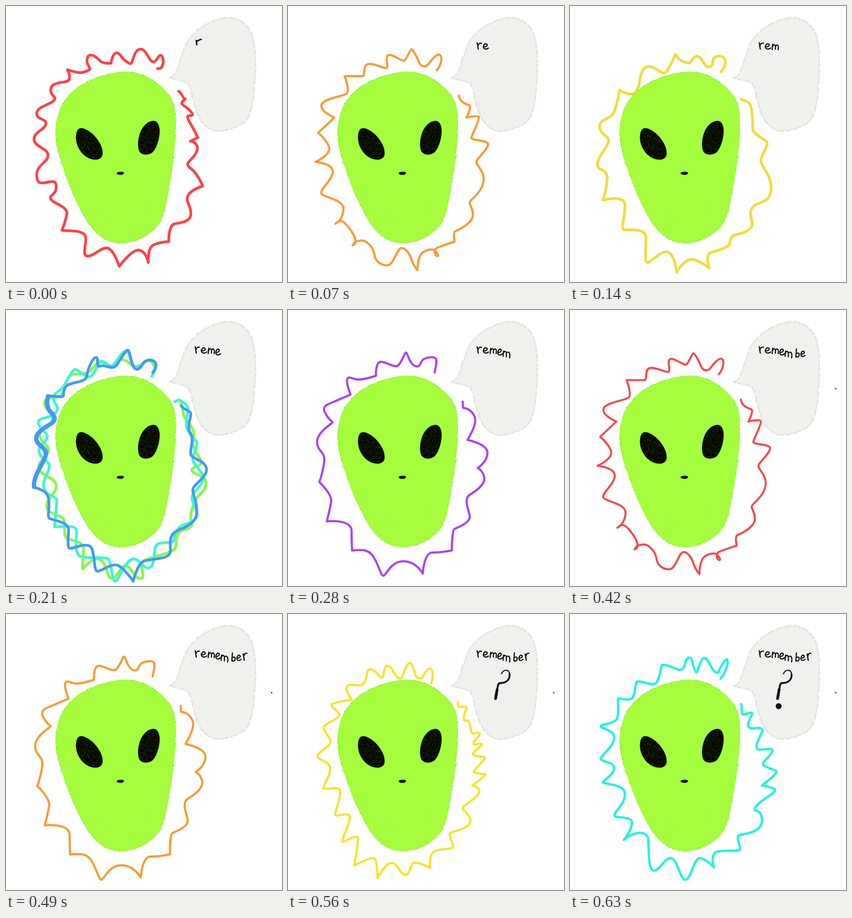
Recreate the animation shown at these times as an HTML page without scripts. Size 512 by 512 pixels, loop 0.7 s.

```html
<!DOCTYPE html>
<html lang="en">
<head>
<meta charset="utf-8">
<title>Remember?</title>
<style>
html, body { margin: 0; width: 100%; height: 100%; overflow: hidden; background: #fff; }
svg { display: block; width: 100%; height: 100%; fill: none; stroke-linecap: round; stroke-linejoin: round; }

/* One aura per 70 ms step */
.aura { opacity: 0; stroke-width: 4; animation: flash .7s step-end infinite; animation-delay: calc(var(--i) * 70ms - 700ms); }
@keyframes flash { 0% { opacity: 1 } 10%, 100% { opacity: 0 } }

/* Lettering stays once it has been written */
.ink { stroke: #0a0a0a; stroke-width: 2.1; }
.on { opacity: 0; animation: .7s step-end infinite; }
@keyframes on1 { 10%, 100% { opacity: 1 } }
@keyframes on2 { 20%, 100% { opacity: 1 } }
@keyframes on3 { 30%, 100% { opacity: 1 } }
@keyframes on4 { 40%, 100% { opacity: 1 } }
@keyframes on5 { 50%, 100% { opacity: 1 } }
@keyframes on6 { 60%, 100% { opacity: 1 } }
@keyframes on7 { 70%, 100% { opacity: 1 } }
@keyframes on8 { 80%, 100% { opacity: 1 } }
@keyframes on9 { 90%, 100% { opacity: 1 } }
</style>
</head>
<body>
<svg viewBox="0 0 512 512" role="img" aria-label="Alien saying: remember?">
<defs>
  <filter id="rough" x="-5%" y="-5%" width="110%" height="110%" color-interpolation-filters="sRGB">
    <feTurbulence type="fractalNoise" baseFrequency=".35" numOctaves="2" seed="4"/>
    <feDisplacementMap in="SourceGraphic" scale="3" xChannelSelector="R" yChannelSelector="G"/>
  </filter>
  <filter id="grain" color-interpolation-filters="sRGB">
    <feTurbulence type="fractalNoise" baseFrequency=".25" numOctaves="3" seed="9"/>
    <feColorMatrix values="0 0 0 0 .12  0 0 0 0 .19  0 0 0 0 .04  2 0 0 0 -.85"/>
    <feComposite in2="SourceGraphic" operator="in" result="g"/>
    <feMerge><feMergeNode in="SourceGraphic"/><feMergeNode in="g"/></feMerge>
  </filter>
  <path id="head" d="M220 122C262 122 284 145 299 161C312 174 316 195 315 225C314 262 309 300 303 333C298 362 295 385 284 404C268 425 240 440 213 440C186 440 168 424 153 404C135 376 118 336 106 300C96 270 91 247 92 232C94 198 104 178 120 162C145 136 190 123 220 122Z"/>
  <path id="bubble" d="M303 133C312 131 318 118 321 108C326 92 330 78 337 65C350 44 385 22 411 22C440 22 455 42 459 62C463 85 464 110 461 145C459 175 455 200 446 212C434 224 410 232 391 232C372 230 360 213 354 197C348 180 346 162 340 147C335 138 315 138 303 133Z"/>

  <g id="spiky">
    <path d="M276 119C284 110 287 95 282 91S266 100 261 107S247 114 243 104S231 80 229 80S220 98 216 101S193 88 186 91S188 114 182 115S156 104 147 108S144 130 138 130S105 130 105 130S116 158 108 163S64 172 62 184S86 207 86 207S56 235 56 235S80 256 76 268S51 289 51 289S84 292 83 308S58 340 62 348S105 358 103 378S88 404 88 404S92 398 99 399S124 424 125 434S120 444 120 444"/>
    <path d="M120 444C124 436 128 436 136 435S158 446 160 460S172 481 184 481S202 450 210 449S226 460 229 470S240 490 240 490S240 464 250 457S268 452 270 452S282 464 277 464S270 452 276 449S309 437 309 437S306 420 310 418S344 404 343 386S332 368 340 360S362 340 363 322S346 294 350 287S372 264 371 256S338 250 340 244S356 210 354 206S331 207 331 207S342 186 336 184S318 178 317 166"/>
  </g>
  <g id="loose">
    <path d="M272 116C274 104 278 92 273 89S252 88 248 95S244 108 234 103S222 79 219 79S211 98 204 103S184 97 173 96S163 122 163 122S142 129 131 129S113 121 110 128S116 157 116 157S90 168 76 174S66 188 74 199S85 206 81 210S53 228 54 246S70 262 67 283S58 319 58 319S83 342 80 357S72 392 72 392S118 387 118 410S119 446 119 446"/>
    <path d="M119 446C132 445 148 442 158 457S172 493 177 493S190 466 214 466S250 489 250 489S252 450 268 450S304 446 304 446S304 408 309 406S340 394 337 381S326 350 337 343S366 324 364 311S352 293 352 293S370 282 370 265S333 241 333 241S350 214 347 201S332 182 327 182S326 174 324 170"/>
  </g>
  <g id="zigzag">
    <path d="M266 128C270 112 268 102 264 101S254 108 251 115S238 120 236 112S231 92 226 91S215 108 212 116S200 116 197 110S190 96 184 96S178 112 176 117S166 110 161 106S148 100 147 108S144 126 138 131S112 126 109 135S119 159 119 159S84 164 81 168S98 182 95 189S64 204 66 212S80 230 79 238S54 256 55 264S76 272 78 285S65 318 66 323S97 316 97 330S86 369 88 373S116 366 115 377S100 418 101 422S131 404 130 418S123 466 123 466"/>
    <path d="M123 466C136 462 160 444 163 458S166 490 166 490S180 462 192 462S208 484 218 484S226 460 236 461S264 471 264 471S260 446 272 440S304 438 306 432S294 408 303 405S342 396 338 381S320 364 325 358S356 338 355 329S342 318 342 318S366 300 366 298S344 296 345 292S368 268 365 266S344 264 343 260S362 244 359 241S344 246 344 240S360 224 355 221S342 226 340 218S338 200 333 198S326 202 326 192S334 174 330 172S312 178 315 164"/>
  </g>
</defs>

<g filter="url(#rough)">
  <use href="#bubble" fill="#eff1ed"/>
  <use href="#bubble" stroke="#e2e3e0" stroke-width="3" stroke-dasharray="7 3 2 5"/>
</g>

<g class="aura" style="--i:0;stroke-width:5" stroke="#fb4347">
  <path d="M281 116C291 118 293 104 291 97S286 89 281 97S272 106 267 99S258 80 250 80S239 88 235 100S230 106 222 102S213 87 205 87S195 106 195 106S182 108 175 102S164 91 157 91S149 104 152 109S156 117 156 117S145 126 132 123S114 118 114 118S124 137 112 140S84 142 83 155S95 167 89 175S58 186 57 199S76 208 74 219S52 233 52 247S78 264 78 277S57 295 57 312S62 330 76 327S94 325 93 338S80 350 83 358S116 372 113 386S104 416 104 416"/>
  <path d="M104 416C120 418 147 415 148 430S140 464 152 464S176 447 188 449S210 483 210 483S235 449 248 453S264 476 264 476S262 448 274 443S302 437 302 437S301 406 313 404S344 400 343 384S332 362 338 351S365 334 365 334S357 316 349 307S331 297 341 287S359 265 353 257S342 251 342 251S356 244 356 244S349 230 341 216S337 204 344 203S338 190 329 184S336 172 332 172S327 162 320 158"/>
</g>

<g class="aura" style="--i:1" stroke="#fb9a35"><use href="#spiky"/></g>

<g class="aura" style="--i:2;stroke-width:5" stroke="#f0dc3f">
  <path d="M280 122C288 114 290 102 286 97S272 91 267 97S268 108 261 112S250 109 246 102S236 91 231 95S222 106 222 106S208 104 203 99S196 90 196 90S189 104 181 119S160 112 147 112S131 127 129 141S121 166 109 163S92 156 92 156S88 180 82 196S55 208 55 224S75 240 71 253S51 280 51 294S71 300 69 322S61 360 61 360S102 349 102 370S94 414 100 415"/>
  <path d="M100 415C114 416 141 412 141 430S138 474 143 476S166 454 180 456S198 494 198 494S212 469 226 470S258 486 258 486S250 460 262 457S292 448 295 443S296 427 306 425S340 416 338 403S331 380 341 371S373 366 373 338S353 298 354 286S370 258 365 252S339 238 339 228S338 186 333 181S322 175 318 173"/>
</g>

<g class="aura" style="--i:3;stroke-width:5">
  <g stroke="#86f942">
    <path d="M276 106C270 92 262 90 256 97S240 108 232 101S214 88 208 95S196 106 188 103S176 92 168 100S156 116 146 118S122 116 116 124S113 144 104 156S76 158 72 170S94 196 84 208S58 226 64 238S82 252 78 264S56 282 62 296S92 310 93 326S72 350 76 366S106 378 108 392S106 420 114 424S146 428 144 446S142 480 142 480"/>
    <path d="M142 480C150 472 164 456 176 464S186 496 196 498S212 474 222 474S238 500 250 498S244 472 254 466S304 452 312 444S312 424 320 414S348 408 344 394S346 364 352 352S370 338 371 322S342 304 345 296S370 290 360 276S344 248 348 236S338 208 332 200S330 178 322 168"/>
  </g>
  <g stroke="#3ff5d2">
    <path d="M270 123C283 106 277 92 267 92S250 108 240 106S231 76 223 76S208 92 200 101S182 92 176 95S163 126 153 124S132 107 126 111S112 134 106 143S88 152 88 164S104 180 90 192S58 198 60 210S80 228 76 238S57 252 62 266S84 280 80 294S66 318 71 332S94 344 94 354S90 402 90 402"/>
    <path d="M90 402C106 403 132 396 131 412S128 444 134 454S184 456 190 462S196 500 202 503S218 470 232 463S254 482 266 478S272 442 280 435S312 436 312 425S320 402 328 399S358 392 354 376S340 350 348 340S370 318 365 306S343 284 347 272S358 248 352 242S334 224 334 210S344 182 330 172S318 170 313 170"/>
  </g>
  <g stroke="#4299f8">
    <path d="M272 116C282 104 280 93 266 93S252 111 242 110S231 78 227 75S215 88 206 101S184 100 175 104S173 88 167 88S152 108 150 122S121 132 112 141S110 160 104 161S84 158 78 160"/>
    <path stroke-width="8" d="M78 160C74 174 78 184 82 188S94 200 88 207S56 224 56 238S76 254 74 268S50 306 52 328"/>
    <path d="M52 328C58 332 76 333 79 350S76 382 80 386S116 392 116 407S113 440 118 442S153 428 159 442S163 480 168 484S196 468 208 474S236 503 236 503S244 468 258 465S305 462 305 448S302 418 315 411S354 398 354 374S344 340 347 331S373 310 372 295S346 276 343 269S350 240 342 228S346 194 342 190S328 183 325 178"/>
  </g>
</g>

<g class="aura" style="--i:4" stroke="#a844f4"><use href="#loose"/></g>
<g class="aura" style="--i:5" stroke="#f64fc0"><use href="#zigzag"/></g>
<g class="aura" style="--i:6;stroke-width:3.7" stroke="#f94749"><use href="#spiky"/></g>
<g class="aura" style="--i:7" stroke="#fb9a35"><use href="#loose"/></g>
<g class="aura" style="--i:8" stroke="#f5e427"><use href="#zigzag"/></g>

<g class="aura" style="--i:9;stroke-width:4.3" stroke="#22f3df">
  <path d="M279 120C290 108 294 90 292 85S280 96 277 104S268 110 262 98S252 80 247 82S238 106 235 108S228 92 226 85S216 80 214 90S208 106 200 103S172 90 170 96S166 124 158 129S126 120 123 127S122 152 114 157S90 154 89 158S92 188 86 196S58 204 57 208S81 214 82 229S58 262 57 268S82 274 82 286S62 308 61 312S102 314 102 334S80 368 83 374S116 374 115 388S100 419 100 419"/>
  <path d="M100 419C112 406 143 398 145 418S144 474 155 476S176 450 188 453S204 493 214 493S230 454 240 453S267 470 267 470S260 448 270 442S312 442 315 437S306 412 314 410S357 406 356 382S340 370 343 360S384 330 381 326S356 318 356 318S386 296 383 292S358 284 358 278S379 258 375 252S346 258 346 246S360 218 356 213S336 216 331 209S342 184 337 183S320 190 319 184S320 170 317 167"/>
</g>

<use href="#head" fill="#a5fd3d"/>
<g filter="url(#rough)">
  <use href="#head" stroke="#82d62c" stroke-width="1" stroke-dasharray="2 4 1 6 4 3"/>
  <path d="M95 248Q96 270 102 292M317 236Q317 260 313 284" stroke="#71b82b" stroke-width="1" stroke-dasharray="1 6 1 3"/>
</g>
<path d="M181 387l15 14M233 437l20-9M257 377l7-9" stroke="#93e534" stroke-width="1" stroke-dasharray="2 4"/>
<g fill="#050800">
  <g filter="url(#grain)">
    <path d="M131 234C133 228 137 225 143 227C160 232 174 250 178 264C181 276 179 283 169 285C155 286 143 278 136 266C130 256 128 244 131 234Z"/>
    <path d="M272 213C280 212 285 220 285 231C285 249 278 267 270 273C262 277 251 277 247 269C243 260 245 243 250 232C255 221 264 214 272 213Z"/>
  </g>
  <path d="M205 310C208 307 215 307 219 309C219 313 214 314 210 313Q206 313 205 310Z"/>
</g>

<g class="ink">
  <path class="aura" style="--i:0;stroke-width:2.6" d="M354 72L353 64C356 67 357 62 362 62"/>
  <path class="on" style="animation-name:on1" d="M351 68L353 80M352 75C353 70 356 68 359 69M363 76C368 76 371 73 369 71C365 68 361 74 363 78C365 81 370 80 372 78"/>
  <path class="on" style="animation-name:on2" d="M376 71L375 81M376 75C378 70 382 70 381 80M381 75C384 70 388 72 386 81"/>
  <path class="on" style="animation-name:on3" d="M389 79C394 79 397 76 395 73C391 71 388 78 390 82C392 85 396 83 398 81"/>
  <path class="on" style="animation-name:on4" d="M400 76L399 86M400 79C403 75 406 76 405 87M405 80C409 76 413 79 411 89"/>
  <path class="on" style="animation-name:on5" d="M420 72L419 87M419 82C422 78 426 80 425 84C424 88 421 88 419 86"/>
  <path class="on" style="animation-name:on6" d="M429 82C433 82 436 79 434 77C431 75 427 80 429 85C431 87 434 86 436 84"/>
  <path class="on" style="animation-name:on7" d="M440 74L442 86M441 79C442 74 444 72 447 73"/>
  <g class="on" style="animation-name:on8">
    <path stroke-width="2" d="M396 111C399 103 410 101 411 112"/>
    <path stroke-width="3.4" d="M411 112C412 124 402 128 395 128C388 128 390 134 388 140"/>
    <path stroke-width="5" d="M388 140L385 157"/>
  </g>
  <g fill="#0a0a0a" stroke="none">
    <circle class="on" style="animation-name:on9" cx="387" cy="171" r="5.5"/>
    <rect class="on" style="animation-name:on6" x="492" y="145" width="2" height="2"/>
  </g>
</g>
</svg>
</body>
</html>
```
